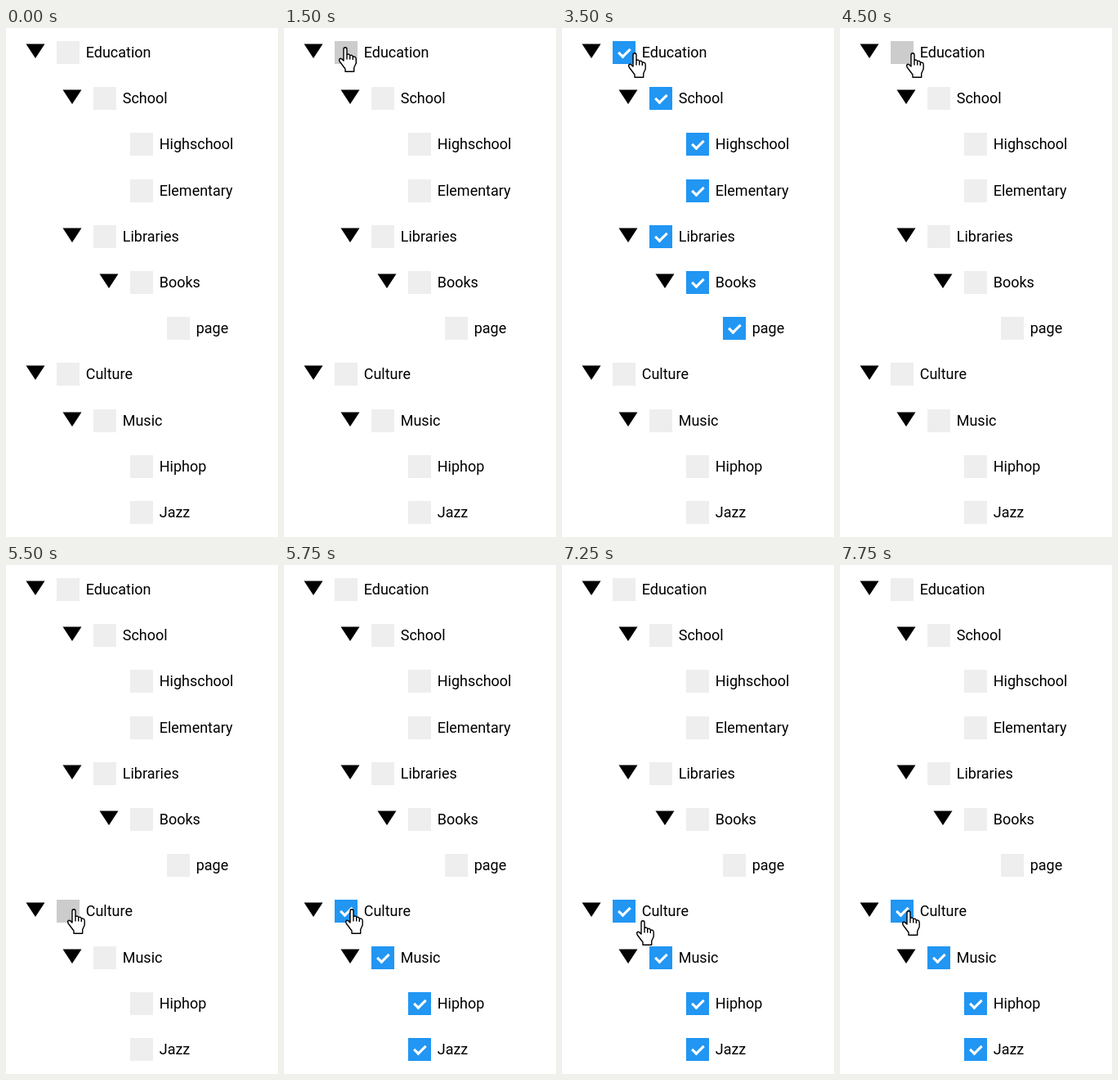
Recreate the animation shown at these times as an HTML page with a canvas. Size 333 by 622 pixels, loop 8 s.

```html
<!DOCTYPE html>
<html lang="en">
<head>
<meta charset="utf-8">
<title>Checkbox tree</title>
<style>
  html, body { margin: 0; width: 100%; height: 100%; overflow: hidden; background: #fff; }
  canvas { display: block; }
</style>
</head>
<body>
<canvas id="stage" width="333" height="622"></canvas>
<script>
const ctx = document.getElementById('stage').getContext('2d');
const LOOP = 8000, INDENT = 45, PITCH = 56.2, SIZE = 28;

// label, depth, has an expander
const rows = [
  ['Education', 0, true], ['School', 1, true], ['Highschool', 2], ['Elementary', 2],
  ['Libraries', 1, true], ['Books', 2, true], ['page', 3],
  ['Culture', 0, true], ['Music', 1, true], ['Hiphop', 2], ['Jazz', 2],
];

// start time, cursor shape, left, top
const cursorSteps = [
  [0, null], [250, 'arrow', 98, 513], [500, null],
  [1250, 'hand', 65, 22], [1500, 'hand', 67, 23],
  [2000, 'arrow', 82, 55], [2250, 'arrow', 64, 68], [2500, 'arrow', 39, 48],
  [2750, 'arrow', 66, 9], [3000, 'arrow', 82, 2],
  [3250, 'hand', 91, 34], [3500, 'hand', 81, 30],
  [4750, 'arrow', 81, 86], [5000, 'arrow', 81, 321],
  [5250, 'hand', 75, 417], [5500, 'hand', 75, 420],
  [7250, 'hand', 91, 434], [7500, 'hand', 91, 415], [7750, 'hand', 76, 422],
];

const shapes = {
  hand: new Path2D('M6 17V3Q6 .8 8 .8Q10 .8 10 3V9.5Q13 8.2 13.7 10.6Q16.5 9.5 17.3 12' +
    'Q21.2 11.5 21.2 15V20L18.7 25.5V30.2H8V27L1.2 18Q0 15.5 1.6 14.4Q3.2 13.4 6 17Z' +
    'M10 9.5V15.5M13.7 10.6V15.5M17.3 12V16'),
  arrow: new Path2D('M.8 1V21L5.2 17L8.2 24L11.4 22.6L8.4 15.8H14.2Z'),
};

const within = (t, from, to) => t >= from && t < to;

function isChecked(row, t) {
  return row < 7 ? within(t, 1750, 4500)
                 : within(t, 5750, 6250) || t >= 7000;
}

function isHovered(row, t) {
  if (row === 0) return within(t, 1250, 2000) || within(t, 4500, 4750);
  return row === 7 && t >= 5500;
}

function drawExpander(x, y) {
  ctx.fillStyle = '#000';
  ctx.beginPath();
  ctx.moveTo(x, y);
  ctx.lineTo(x + 23, y);
  ctx.lineTo(x + 11.5, y + 17.5);
  ctx.fill();
}

function drawTick(x, y) {
  ctx.save();
  ctx.translate(x + 14.4, y + 12.9);
  ctx.rotate(Math.PI / 4);
  ctx.fillStyle = '#fff';
  ctx.fillRect(1.4, -7.3, 3.1, 14.6);
  ctx.fillRect(-4.5, 4.2, 9, 3.1);
  ctx.restore();
}

function drawRow([label, depth, expander], i, t) {
  const dx = depth * INDENT, x = 62 + dx, y = Math.round(16 + i * PITCH);
  const checked = isChecked(i, t);
  if (expander) drawExpander(24.5 + dx, y + 3.4);
  ctx.fillStyle = checked ? '#2196f3' : isHovered(i, t) ? '#ccc' : '#eee';
  ctx.fillRect(x, y, SIZE, SIZE);
  if (checked) drawTick(x, y);
  ctx.fillStyle = '#000';
  ctx.fillText(label, 97.7 + dx, y + 20);
}

function drawCursor(t) {
  const [, kind, x, y] = cursorSteps.findLast(step => step[0] <= t);
  if (!kind) return;
  ctx.save();
  ctx.translate(x, y);
  ctx.fillStyle = '#fff';
  ctx.strokeStyle = '#000';
  ctx.lineWidth = 1.4;
  ctx.lineJoin = 'round';
  ctx.fill(shapes[kind]);
  ctx.stroke(shapes[kind]);
  ctx.restore();
}

function draw(now) {
  const t = now % LOOP;
  ctx.fillStyle = '#fff';
  ctx.fillRect(0, 0, 333, 622);
  ctx.font = '18px Roboto, sans-serif';
  rows.forEach((row, i) => drawRow(row, i, t));
  drawCursor(t);
}

function tick() {
  draw(performance.now());
  requestAnimationFrame(tick);
}
tick();
</script>
</body>
</html>
```
